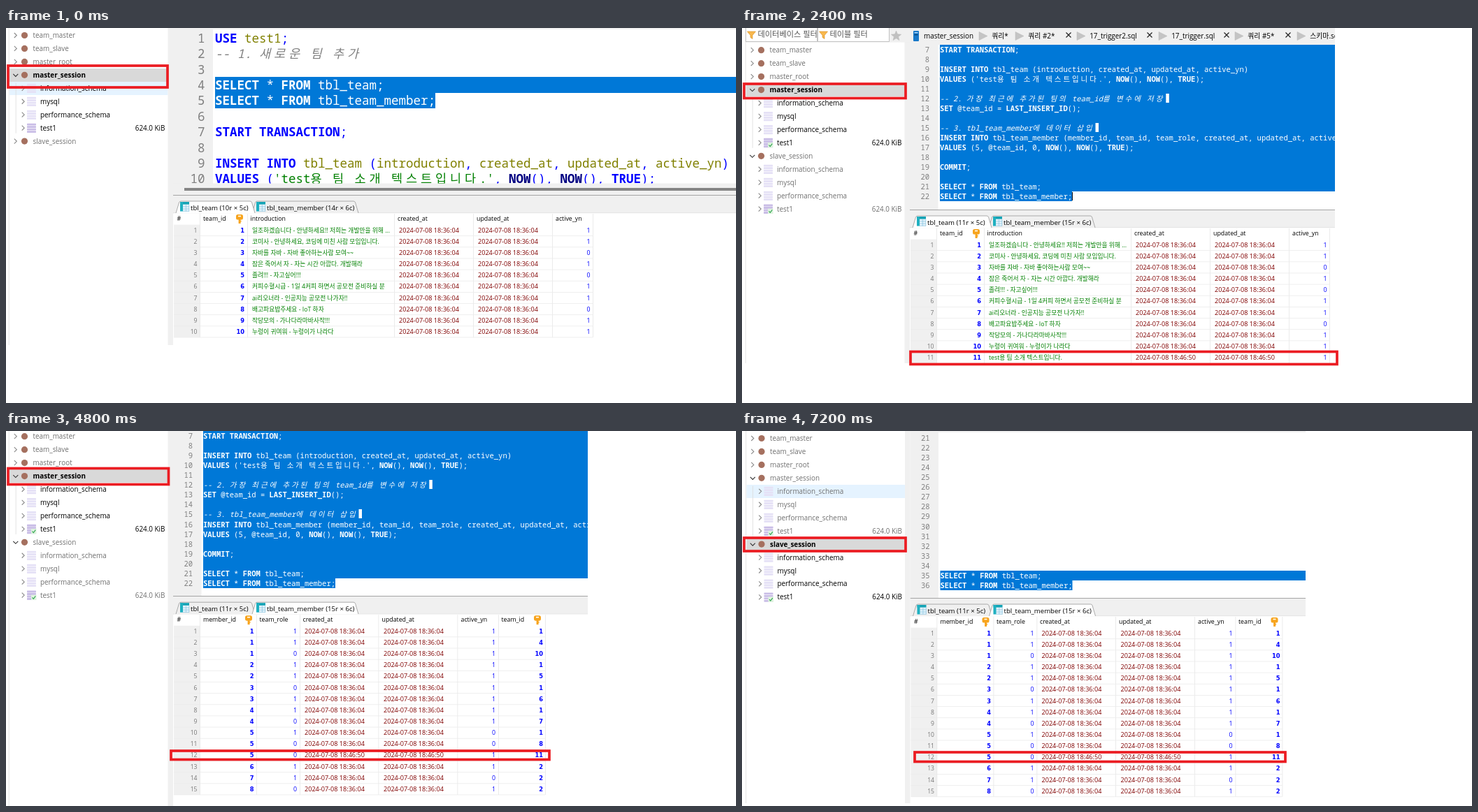
An HTML page for the animation above (8400 ms loop, 1044 by 537 pixels).

```html
<!DOCTYPE html>
<html lang="ko">
<head>
<meta charset="utf-8">
<title>Replication walkthrough</title>
<style>
  html, body { margin: 0; width: 100%; height: 100%; overflow: hidden; background: #fff; }
  svg { display: block; width: 1044px; height: 537px; }
  text { white-space: pre; font-family: "Open Sans", "Noto Sans CJK KR", "Noto Sans CJK JP", sans-serif; }
  .tree { font-size: 9.9px; }
  .bold { font-weight: 700; }
  .end { text-anchor: end; }
  .tab { font-size: 9.9px; }
  .result { font-size: 9.6px; }
  .filter { font-size: 11.2px; fill: #555; }
  .head { font-size: 8.8px; }
  .date { font-size: 9.1px; font-weight: 500; fill: #800000; }
  .intro { font-size: 8.75px; font-weight: 500; fill: #008000; }
  .num { font-size: 8.8px; font-weight: 500; fill: #00f; }
  .key { font: 700 8.3px "DejaVu Sans", sans-serif; fill: #00f; }
  .row { font-size: 8.6px; fill: #777; }
  .code { font-family: "Noto Sans Mono", "Noto Sans CJK KR", "Noto Sans CJK JP", monospace; fill: #00f; }
  .line { fill: #808080; }
  .kw { font-weight: 700; }
  .fn { font-weight: 700; fill: #000080; }
  .id { fill: #808000; }
  .str { fill: #008000; }
  .note { font-style: italic; fill: #808080; }
  .sel, .sel tspan { fill: #fff; }
</style>
</head>
<body>
<svg id="stage" viewBox="0 0 1044 537"></svg>
<script>
const STEP = 1200;
const GREY = '#f0f0f0', BLUE = '#0078d7', RED = '#eb1c22';
const OLD = '2024-07-08 18:36:04', NEW = '2024-07-08 18:46:50';

const SELECTS = ['SELECT * FROM tbl_team;', 'SELECT * FROM tbl_team_member;'];
const SCRIPT = [
  'USE test1;', '-- 1. 새로운 팀 추가', '', ...SELECTS, '',
  'START TRANSACTION;', '',
  'INSERT INTO tbl_team (introduction, created_at, updated_at, active_yn)',
  "VALUES ('test용 팀 소개 텍스트입니다.', NOW(), NOW(), TRUE);", '',
  '-- 2. 가장 최근에 추가된 팀의 team_id를 변수에 저장',
  'SET @team_id = LAST_INSERT_ID();', '',
  '-- 3. tbl_team_member에 데이터 삽입',
  'INSERT INTO tbl_team_member (member_id, team_id, team_role, created_at, updated_at, active_yn)',
  'VALUES (5, @team_id, 0, NOW(), NOW(), TRUE);', '',
  'COMMIT;', '', ...SELECTS
];
const LATE = [...Array(34).fill(''), ...SELECTS];

const TEAMS = [
  '일조하겠습니다 - 안녕하세요!! 저희는 개발만을 위해 ...',
  '코미사 - 안녕하세요, 코딩에 미친 사람 모임입니다.',
  '자바를 자바 - 자바 좋아하는사람 모여~~',
  '잠은 죽어서 자 - 자는 시간 아깝다. 개발해라',
  '졸려!!! - 자고싶어!!!',
  '커피수혈시급 - 1일 4커피 하면서 공모전 준비하실 분',
  'ai리오너라 - 인공지능 공모전 나가자!!',
  '배고파요밥주세요 - IoT 하자',
  '작당모의 - 가나다라마바사작!!!',
  '누렁이 귀여워 - 누렁이가 나라다',
  'test용 팀 소개 텍스트입니다.'
];
const TEAM_ACTIVE = '11010110111';
// member, role, active, team
const MEMBERS = ('1 1 1 1,1 1 1 4,1 0 1 10,2 1 1 1,2 1 1 5,3 0 1 1,3 1 1 6,4 1 1 1,' +
  '4 0 1 7,5 1 0 1,5 0 0 8,5 0 1 11,6 1 1 2,7 1 0 2,8 0 1 2').split(',').map(r => r.split(' '));

// dx: shift; right, bottom: visible area; tabs: result tab centre;
// tree, code: centre of the first row; boxes: left, top, right, bottom
const SCENES = [
  { dx: 0, right: 1044, bottom: 454, tabs: 257, tree: 10.5, code: 14.6, first: 1, big: true, top: 2,
    hover: true, boxes: [[1, 52, 233, 87]] },
  { dx: 0, right: 815, bottom: 510, tabs: 248.5, tree: 2.2, code: 6.2, first: 1, big: true, caret: 4,
    member: true, boxes: [[1, 48.5, 234.5, 73]] },
  { dx: 1, right: 848, bottom: 480, tabs: 278, tree: 31.7, code: 31.2, first: 7, bar: 0, caret: 22,
    boxes: [[1, 78, 236, 102.5], [239, 461.5, 853, 483.5]] },
  { dx: -1.3, right: 871, bottom: 482, tabs: 259, tree: 12.7, code: 12.8, first: 7, top: 4.5, edge: true,
    boxes: [[1, 59.5, 232.5, 81], [234, 444, 851, 462.5]] },
  { dx: 0, right: 832, bottom: 537, tabs: 254.2, tree: 7.7, code: 7.5, first: 7, member: true,
    boxes: [[1, 51.5, 234.5, 78.5], [234, 456, 779, 472.5]] },
  { dx: -.7, right: 871.5, bottom: 493, tabs: 275.2, tree: 28.8, code: 28.8, first: 21, bar: -2.7, slave: true,
    focus: true, boxes: [[1, 167.5, 239.5, 194.5], [236, 459.5, 847.5, 483]] },
  { dx: 1.5, right: 806, bottom: 533, tabs: 257, tree: 10.5, code: 10.5, first: 21, top: 2, slave: true,
    hover: true, member: true, boxes: [[1, 151, 236, 174], [245, 458, 779, 475.5]] }
];

const rect = (x, y, w, h, fill, more = '') =>
  `<rect x="${x}" y="${y}" width="${w}" height="${h}" fill="${fill}" ${more}/>`;
const path = (d, stroke, width = 1, fill = 'none') =>
  `<path d="${d}" stroke="${stroke}" stroke-width="${width}" fill="${fill}"/>`;
const text = (x, y, s, cls, fill) =>
  `<text x="${x}" y="${y}" class="${cls}"${fill ? ` fill="${fill}"` : ''}>${s}</text>`;
const cells = c => /[가-힣]/.test(c) ? 2 : 1;
const width = s => [...s].reduce((n, c) => n + cells(c), 0);

function paint(line) {
  if (line.startsWith('--')) return `<tspan class="note">${line}</tspan>`;
  return line.replace(/'[^']*'|@?[A-Za-z_]\w*/g, t => {
    const cls = t[0] === "'" ? 'str' : /^(NOW|LAST_INSERT_ID)$/.test(t) ? 'fn' : /^[A-Z]/.test(t) ? 'kw' : 'id';
    return `<tspan class="${cls}">${t}</tspan>`;
  });
}

function codeLine(x, y, line, cell, selected) {
  let col = 0;
  const xs = [...line].map(c => {
    const at = x + col * cell;
    col += cells(c);
    return at.toFixed(2);
  });
  return `<text x="${xs.join(' ')}" y="${y}" class="code${selected ? ' sel' : ''}">${paint(line)}</text>`;
}

function editor(s) {
  const lines = s.slave ? LATE : SCRIPT;
  const cell = s.big ? 10.5 : 6.3, size = cell / .6, pitch = s.big ? 22.4 : 14.03;
  const x = s.big ? 299 : 282, gutter = s.big ? 296 : 279.5;
  const from = s.big ? 4 : s.slave ? 35 : 7, to = s.big ? 5 : lines.length;
  const last = s.big ? 10 : lines.length;
  const edge = n => Math.round(s.code + (n - s.first - .5) * pitch - .3);
  const end = n => x + width(lines[n - 1]) * cell;
  let out = rect(239, 0, gutter - 239, s.tabs - 17, GREY) +
    rect(x, edge(from), 900, edge(to) - edge(from), BLUE) +
    rect(x, edge(to), end(to) - x, edge(to + 1) - edge(to), BLUE) + `<g font-size="${size}">`;
  for (let n = s.first; n <= last; n++) {
    const line = lines[n - 1], base = s.code + (n - s.first) * pitch + size * .357;
    const selected = n >= from && n <= to;
    if (selected && line.startsWith('--')) out += rect(end(n) + 2, edge(n), 4.5, 13, '#fff');
    out += text(s.big ? 284.5 : 267, base, n, 'code line end') + codeLine(x, base, line, cell, selected);
    if (n === s.caret) out += rect(s.big ? x : end(n), edge(n) + 1, 1, pitch - 2, '#111');
  }
  out += '</g>';
  if (s.top) out += rect(239, 0, 900, s.top, GREY);
  if (s.big) out += rect(239, s.tabs - 34.5, 900, 18, GREY) + rect(255, s.tabs - 28, 900, 4, '#858585');
  return out;
}

function chevron(x, y, open, color) {
  return path(open ? `M${x - 3.5} ${y - 1.5}l3.5 3.5l3.5-3.5` : `M${x - 2} ${y - 3.5}l3.5 3.5l-3.5 3.5`, color, 1.1);
}

function dbIcon(y, inUse, checked) {
  let out = '';
  for (let i = 0; i < 4; i++) out += rect(30, y - 6.5 + i * 3.5, 13, 2.8, inUse ? '#c9bde6' : '#e5e1f6', 'rx=".6"');
  if (checked && inUse) out += rect(36, y - .5, 7.5, 7.5, '#dff3df') + path(`M37.5 ${y + 3.2}l1.8 2l3-4`, '#35a853', 1.2);
  return out;
}

function tree(s) {
  const pitch = 18.95, rows = ['team_master', 'team_slave', 'master_root'].map(name => ({ name }));
  const early = s.big;
  for (const side of ['master', 'slave']) {
    const live = (side === 'slave') === !!s.slave, open = live || !early;
    rows.push({ name: side + '_session', open, live, title: live });
    if (open) for (const name of ['information_schema', 'mysql', 'performance_schema', 'test1'])
      rows.push({ name, live, child: true });
  }
  let out = rect(3.7, 0, 1, 537, '#e4e4e4');
  if (s.hover) out += rect(5, Math.round(s.tree + 3.5 * pitch), 226.5, 19, '#e5f3ff');
  out += rect(13.7, s.tree + 3.6 * pitch, .8, 3.8 * pitch, '#dcdcdc');
  rows.forEach((r, i) => {
    const y = s.tree + i * pitch, base = y + 3.5, color = r.live ? '#000' : '#707070';
    if (r.title) out += rect(5, Math.round(y - 9.5), 226, 19, s.focus ? '#cce8ff' : '#d9d9d9');
    if (r.child) {
      const used = r.name === 'test1';
      out += chevron(24.7, y, false, '#888') + dbIcon(y, used, !early) + text(49, base, r.name, 'tree', color);
      if (used) out += text(227.5, base, '624.0 KiB', 'tree end', color);
    } else {
      out += chevron(13.8, y, r.open, r.open ? '#333' : '#888') +
        `<circle cx="26.5" cy="${y}" r="4.6" fill="#a5705f"/>` +
        text(38.5, base, r.name, r.title ? 'tree bold' : 'tree', color);
    }
  });
  out += rect(231.5, 0, 7.5, 537, GREY);
  if (s.edge) out += rect(4, 0, 235, 2, GREY) + rect(4, .3, 102, 1, '#aaa') + rect(108, .3, 102, 1, '#aaa');
  return out;
}

function filterBox(x, label) {
  return rect(x, -3, 102, 22.5, '#fff', 'stroke="#b5b5b5" stroke-width=".8"') +
    path(`M${x + 2} 5h12l-4.5 5.5v5l-3-2v-3z`, '#d98d1e', .6, '#f8b84e') +
    text(x + 17, 13.4, label, 'filter');
}

function topBars(s) {
  const play = x => path(`M${x} 5.5l12 6l-12 6z`, '#b9b9b9', .5, '#c4c4c4');
  const close = x => path(`M${x - 3.5} 6.5l7 7m0-7l-7 7`, '#222', 1.2);
  const shift = s.slave ? -8.7 : 0;
  const queries = [[338, '쿼리*'], [390, '쿼리 #2*', 466], [478, '17_trigger2.sql', 582],
    [595, '17_trigger.sql', 692], [704, '쿼리 #5*', 780], [793, '스키마.sql*', 878]];
  let out = `<g transform="translate(0 ${s.bar})">` + rect(4, 0, 235, 20.5, GREY) +
    filterBox(4.5, '데이터베이스 필터') + filterBox(107.5, '테이블 필터') +
    path('M219.5 4l2 4.8l5.2.4l-4 3.4l1.3 5l-4.5-2.8l-4.5 2.8l1.3-5l-4-3.4l5.2-.4z', '#bbb', .5, '#c0c0c0') +
    rect(239, -1, 900, 25, GREY) +
    rect(244, 4, 8, 15, '#1778c8', 'rx="1"') + rect(245.5, 6, 5, 1.3, '#bfe2ff') + rect(245.5, 9, 5, 1.3, '#0b3f70') +
    text(259, 15, s.slave ? 'slave_session' : 'master_session', 'tab');
  for (const [x, label, end] of queries)
    out += play(x + shift) + text(x + 18.2 + shift, 15, label, 'tab') + (end ? close(end + shift) : '');
  return out + '</g>';
}

function resultTab(x, right, y, label, active) {
  const shape = `M${x} ${y + 8}l4.5-15q.7-2 2.5-2H${right - 8}q2 0 2.6 2l4.4 15`;
  const ix = x + 6, iy = y - 8;
  return path(shape, '#999', .8, active ? '#fff' : GREY) +
    rect(ix, iy, 13, 13.5, '#e3f3fb') +
    path(`M${ix + 4} ${iy + 6.8}h9m-9 3.3h9m-9 3.2h9m-4.6-9v9.2m4.4-9.2v9.2`, '#8cc5e0', .7) +
    rect(ix, iy, 13, 3.6, '#13a3b5') + rect(ix, iy, 4, 13.5, '#1fb0c0') +
    text(x + 21, y + 3.6, label, 'result');
}

function keyIcon(x, y) {
  return `<rect x="${x - 5}" y="${y - 6}" width="10" height="7.5" rx="2.6" fill="#f7a41d"/>` +
    rect(x - 2, y - 4.3, 4, 1.6, '#fff') + rect(x - 1.4, y + 1, 3, 6, '#f7a41d') + rect(x + 1, y + 3, 1.6, 1.4, '#f7a41d');
}

function results(s) {
  const t = s.tabs, pitch = 16.15, extra = !s.big;
  const labels = extra ? ['11r', '15r'] : ['10r', '14r'];
  const tabs = [
    resultTab(243, 357, t, `tbl_team (${labels[0]} × 5c)`, !s.member),
    resultTab(352, 505, t, `tbl_team_member (${labels[1]} × 6c)`, s.member)
  ];
  if (!s.member) tabs.reverse();
  let out = rect(239, t - 17.5, 900, 25.5, GREY) + rect(239, Math.round(t - 18), 900, 1, '#a5a5a5') +
    rect(239, t + 7.6, 900, .8, '#d5d5d5') + tabs.join('') + rect(239.5, t + 8.2, 900, 400, '#fff');

  const rows = s.member
    ? MEMBERS.filter(m => extra || m[3] !== '11').map(([id, role, on, team]) => {
        const date = team === '11' ? NEW : OLD;
        return [[354.5, id, 'key end'], [416, role, 'num end'], [427, date, 'date'],
          [540, date, 'date'], [700, on, 'num end'], [768, team, 'key end']];
      })
    : TEAMS.slice(0, extra ? 11 : 10).map((intro, i) => {
        const date = i === 10 ? NEW : OLD;
        return [[341, i + 1, 'key end'], [352, intro, 'intro'], [562, date, 'date'],
          [675, date, 'date'], [835.5, TEAM_ACTIVE[i], 'num end']];
      });
  const heads = s.member
    ? [[282, 'member_id'], [362.5, 'team_role'], [424.5, 'created_at'], [537.5, 'updated_at'], [650.5, 'active_yn'], [708.5, 'team_id']]
    : [[282, 'team_id'], [349.5, 'introduction'], [560, 'created_at'], [673, 'updated_at'], [786, 'active_yn']];
  const rules = s.member ? [277, 358, 420, 532.5, 645.5, 704, 771] : [277, 345, 555, 668, 781, 839];
  const keys = s.member ? [347, 760] : [334];

  const top = t + 24.6, bottom = top + rows.length * pitch;
  out += rect(240, top, 37.5, bottom - top, GREY);
  for (const x of rules) out += rect(x, t + 9, .8, bottom - t - 9, '#e6e6e6');
  out += text(244.5, t + 19, '#', 'head');
  for (const [x, name] of heads) out += text(x, t + 18.8, name, 'head');
  for (const x of keys) out += keyIcon(x, t + 16);
  rows.forEach((row, i) => {
    const y = top + i * pitch, base = y + 11;
    out += rect(240, y + pitch - .5, rules.at(-1) - 240, .8, '#ebebeb') + text(273.5, base, i + 1, 'row end');
    for (const [x, value, cls] of row) out += text(x, base, value, cls);
  });
  return out;
}

function scene(s, i) {
  const marks = s.boxes.map(([l, t, r, b]) =>
    rect(l + 2, t + 2, r - l - 4, b - t - 4, 'none', `stroke="${RED}" stroke-width="3.7"`)).join('');
  return `<g class="scene" style="display:none">
    <clipPath id="crop${i}">${rect(0, 0, s.right, s.bottom, '#000')}</clipPath>
    <g clip-path="url(#crop${i})"><g transform="translate(${s.dx} 0)">
      ${editor(s)}${results(s)}${tree(s)}${s.bar === undefined ? '' : topBars(s)}
    </g></g>${marks}</g>`;
}

const stage = document.getElementById('stage');
stage.innerHTML = SCENES.map(scene).join('');
const scenes = [...stage.querySelectorAll('.scene')];
const start = performance.now();
let shown = -1;

function tick() {
  const now = Math.floor((performance.now() - start) / STEP) % scenes.length;
  if (now !== shown) {
    scenes.forEach((g, i) => g.style.display = i === now ? '' : 'none');
    shown = now;
  }
  requestAnimationFrame(tick);
}
tick();
</script>
</body>
</html>
```
